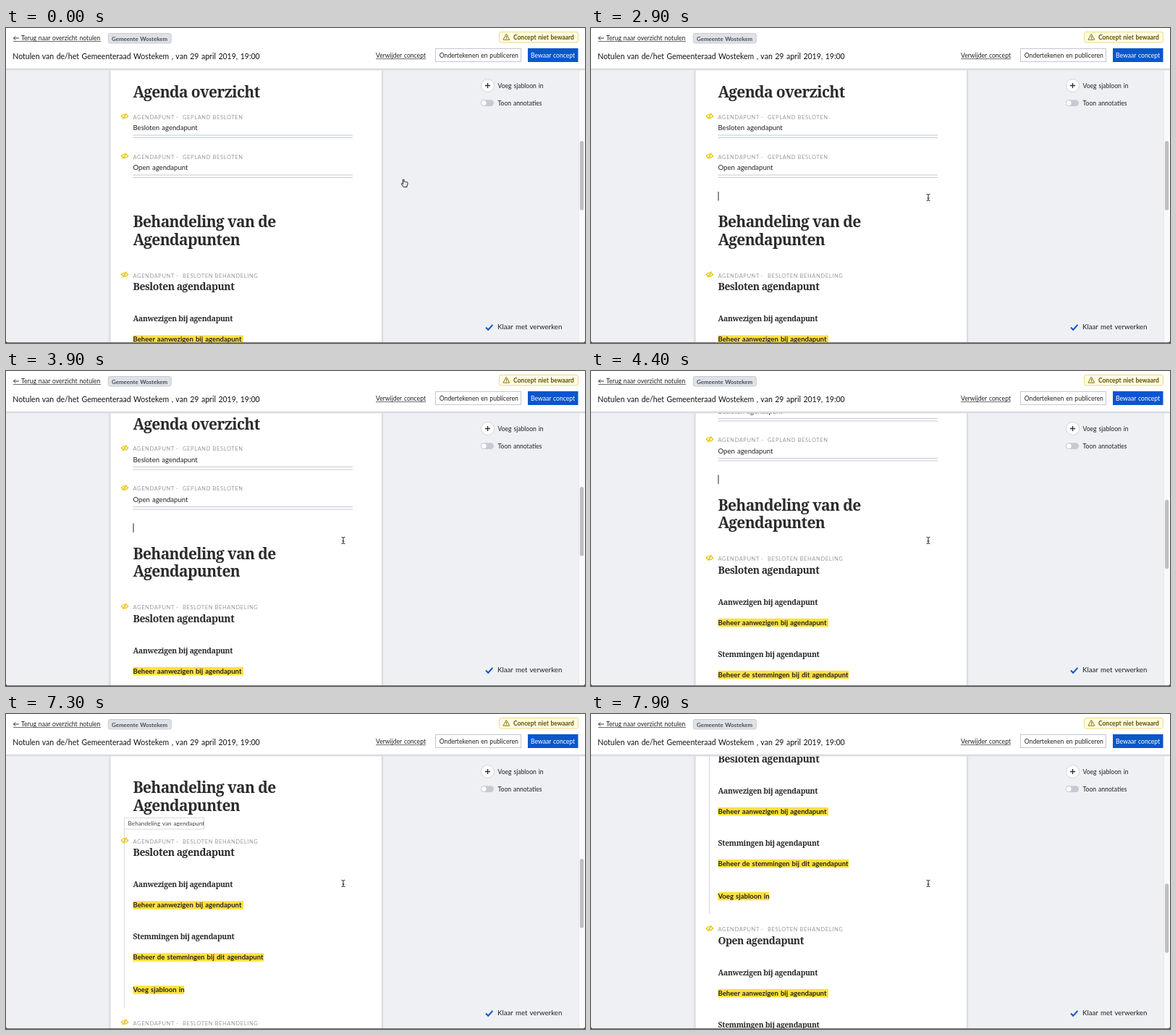
Animation, 800 px wide and 435 px high, one loop 8 s. Source, as an HTML page:

```html
<!DOCTYPE html>
<html lang="nl">
<head>
<meta charset="utf-8">
<title>Notulen</title>
<style>
  @property --scroll { syntax: "<number>"; inherits: true; initial-value: 0; }

  html, body { margin: 0; width: 100%; height: 100%; overflow: hidden; background: #fff; }
  svg { display: block; }
  #stage { --loop: 8s; animation: scroll var(--loop) linear infinite; }

  text { font-family: Lato, "Open Sans", sans-serif; font-size: 8.6px; fill: #222; word-spacing: .08em; white-space: pre; }
  .title { font-size: 10.5px; fill: #111; }
  .body { font-size: 9.55px; }
  .strong { font-weight: 700; }
  .meta text { font-size: 7.5px; letter-spacing: .62px; word-spacing: 0; fill: #9b9b9b; }
  .h1, .h3, .h4 { font-family: "Noto Serif", serif; font-weight: 700; letter-spacing: -.031em; word-spacing: 0; fill: #2b2b2b; }
  .h1 { font-size: 21px; }
  .h3 { font-size: 13.95px; }
  .h4 { font-size: 10.4px; font-weight: 600; }
  .mark { fill: #ffe13d; }
  .rule { stroke: #c3cad6; }
  .line { fill: none; stroke-linecap: round; stroke-linejoin: round; }

  #content { transform: translateY(calc(var(--scroll) * -1px)); }
  #thumb { transform: translateY(calc(var(--scroll) * .265px)); }
  #hover { animation: hover var(--loop) step-end infinite; }
  #caret { animation: caret var(--loop) step-end infinite; }
  #pointer { animation: pointer var(--loop) linear infinite; }
  #hand { animation: hand var(--loop) step-end infinite; }
  #beam { animation: beam var(--loop) step-end infinite; }

  /* 1.25% is one tick of 100 ms */
  @keyframes scroll {
    0% { --scroll: 0; }
    43.75% { --scroll: 0; animation-timing-function: steps(4); }
    48.75% { --scroll: 15.5; animation-timing-function: steps(5); }
    55% { --scroll: 82.5; animation-timing-function: steps(3); }
    58.75% { --scroll: 128; animation-timing-function: steps(3); }
    62.5% { --scroll: 162; animation-timing-function: steps(1); }
    63.75% { --scroll: 166; }
    91.25% { --scroll: 166; animation-timing-function: steps(2); }
    93.75% { --scroll: 190; animation-timing-function: steps(4); }
    98.75%, 100% { --scroll: 295.5; }
  }
  @keyframes hover {
    0% { opacity: 0; transform: none; }
    57.5% { opacity: 1; transform: none; }
    65%, 100% { opacity: 1; transform: translateX(1px); }
  }
  @keyframes caret {
    0%, 28.75%, 66.25%, 78.75%, 91.25%, 100% { opacity: 0; }
    22.5%, 35%, 72.5%, 85% { opacity: 1; }
  }
  @keyframes pointer {
    0% { transform: translate(551px, 214px); }
    6.25% { transform: translate(551px, 214px); animation-timing-function: steps(8); }
    16.25%, 100% { transform: translate(466px, 234px); }
  }
  @keyframes hand { 0% { opacity: 1; } 11.25%, 100% { opacity: 0; } }
  @keyframes beam { 0% { opacity: 0; } 11.25%, 100% { opacity: 1; } }
</style>
</head>
<body>
<svg id="stage" width="800" height="435" viewBox="0 0 800 435">
  <defs>
    <clipPath id="view"><rect y="57" width="800" height="378"/></clipPath>
    <filter id="soft" x="-5%" width="110%"><feGaussianBlur stdDeviation="1.5"/></filter>
    <g id="eye" class="line" stroke="#e9c80e" stroke-width="1.3">
      <path d="M-4.8 0Q0 -5.4 4.8 0Q0 5.4 -4.8 0Z"/>
      <path d="M-2.4 3.6L2.4 -3.8"/>
      <circle r="1.2" fill="#e9c80e" stroke="none"/>
    </g>
    <g id="planned" class="meta">
      <use href="#eye" x="164" y="-4"/>
      <text x="175.5">AGENDAPUNT</text><text x="235">-</text>
      <text x="244">GEPLAND BESLOTEN</text>
    </g>
    <g id="rules" class="rule">
      <path d="M175.5 .5h303.5M175.5 4h303.5"/>
    </g>
    <g id="treatment">
      <g class="meta">
        <use href="#eye" x="164" y="340.5"/>
        <text x="175.5" y="344.5">AGENDAPUNT</text><text x="235" y="344.5">-</text>
        <text x="244" y="344.5">BESLOTEN BEHANDELING</text>
      </g>
      <text class="h4" x="175.5" y="405">Aanwezigen bij agendapunt</text>
      <rect class="mark" x="175.5" y="424.3" width="152.5" height="11.5"/>
      <text class="body strong" x="175.5" y="433.3">Beheer aanwezigen bij agendapunt</text>
      <text class="h4" x="175.5" y="477.3">Stemmingen bij agendapunt</text>
      <rect class="mark" x="175.5" y="496.3" width="180.7" height="11.5"/>
      <text class="body strong" x="175.5" y="505.3">Beheer de stemmingen bij dit agendapunt</text>
      <rect class="mark" x="175.5" y="541.3" width="70.7" height="11.5"/>
      <text class="body strong" x="175.5" y="550.3">Voeg sjabloon in</text>
    </g>
  </defs>

  <rect width="800" height="435" fill="#eff0f3"/>
  <rect x="143.5" y="50" width="376.5" height="400" fill="#c4c8d0" filter="url(#soft)"/>
  <rect x="144.5" y="50" width="374.5" height="400" fill="#fff"/>

  <g clip-path="url(#view)">
    <g id="content">
      <text class="h1" x="175.5" y="96">Agenda overzicht</text>
      <use href="#planned" y="125.8"/>
      <text class="body" x="175.5" y="141.3">Besloten agendapunt</text>
      <use href="#rules" y="147.5"/>
      <use href="#planned" y="180.8"/>
      <text class="body" x="175.5" y="196.3">Open agendapunt</text>
      <use href="#rules" y="202.5"/>
      <path id="caret" d="M176 226v12.5" stroke="#222"/>
      <text class="h1" x="175.5" y="275.3">Behandeling van de</text>
      <text class="h1" x="175.5" y="299.8">Agendapunten</text>

      <g id="hover">
        <path d="M162.5 309v262.5" stroke="#d0d5de"/>
        <rect x="162.5" y="309.5" width="110" height="15.5" fill="#fff" stroke="#d6d9df"/>
        <text x="167.5" y="320" style="font-size:8.26px;fill:#444">Behandeling van agendapunt</text>
      </g>

      <use href="#treatment"/>
      <text class="h3" x="175.5" y="362.3">Besloten agendapunt</text>
      <use href="#treatment" y="251"/>
      <text class="h3" x="175.5" y="613.5">Open agendapunt</text>
    </g>
  </g>

  <!-- side tools -->
  <circle cx="665.5" cy="79.5" r="9" fill="#fff" stroke="#cfd3db"/>
  <path d="M662 79.5h7M665.5 76v7" stroke="#333" stroke-width="1.4"/>
  <text x="679.5" y="82.7">Voeg sjabloon in</text>
  <rect x="656" y="99.3" width="18" height="8.6" rx="4.3" fill="#c6cad4"/>
  <circle cx="660.3" cy="103.6" r="3.9" fill="#fff" stroke="#c0c5cf" stroke-width=".8"/>
  <text x="679.5" y="106.8">Toon annotaties</text>
  <path d="M663 413.5l3.2 3.2 6.2 -6.8" fill="none" stroke="#0b56cc" stroke-width="2"/>
  <text x="679" y="416.3" style="font-size:9.7px">Klaar met verwerken</text>

  <!-- scrollbar -->
  <rect x="791" y="57" width="9" height="378" fill="#fafafa"/>
  <path d="M791.5 57v378" stroke="#e8e8e8"/>
  <rect id="thumb" x="793" y="156" width="5.2" height="95.5" rx="2.6" fill="#bfbfbf"/>

  <!-- header -->
  <rect y="57" width="800" height="1.5" fill="#dfe1e6"/>
  <rect width="800" height="56" fill="#fff"/>
  <rect y="56" width="800" height="1" fill="#cfd2d9"/>
  <path class="line" d="M17.5 14h-7M13 11.5l-2.5 2.5l2.5 2.5" stroke="#222" stroke-width=".9"/>
  <text x="21" y="17">Terug naar overzicht notulen</text>
  <path d="M10 18.5h121" stroke="#444" stroke-width=".8"/>
  <rect x="141.3" y="7.5" width="87" height="13.5" rx="2.5" fill="#dfe1e6" stroke="#c9ccd3"/>
  <text class="strong" x="146" y="17.5" style="font-size:7.95px;fill:#4a4f59">Gemeente Wostekem</text>
  <text class="title" x="9.3" y="43">Notulen van de/het Gemeenteraad Wostekem , van 29 april 2019, 19:00</text>

  <rect x="681.5" y="5.5" width="109" height="14.5" rx="2.5" fill="#fffbe3" stroke="#ecdc86"/>
  <path class="line" d="M691.5 8.6l4.2 7.6h-8.4z" fill="#ffe13d" stroke="#8a7400"/>
  <path d="M691.5 11v2.6M691.5 14.3v1" stroke="#5c4d00" stroke-width=".9"/>
  <text class="strong" x="701" y="15.8" style="font-size:8.46px;fill:#5f5000">Concept niet bewaard</text>

  <text x="511" y="41">Verwijder concept</text>
  <path d="M511 42.6h69" stroke="#444" stroke-width=".8"/>
  <rect x="593.5" y="28.5" width="118" height="18" fill="#fff" stroke="#c3c7d0"/>
  <text x="598.8" y="41">Ondertekenen en publiceren</text>
  <rect x="721" y="28" width="69.5" height="19" fill="#0b56cc"/>
  <text x="725" y="41" style="fill:#fff">Bewaar concept</text>

  <!-- window edge -->
  <path d="M0 434.5h800" stroke="#6b6b6b"/>
  <path d="M0 432v3h3q-2.5 -.5 -3 -3zM800 432v3h-3q2.5 -.5 3 -3z" fill="#444"/>

  <g id="pointer">
    <path id="hand" class="line" d="M-2.6 -4.6q.9 -.9 1.7 0v3.2q.9 -.7 1.6 .1q.9 -.6 1.6 .2q.9 -.5 1.7 .4v2.7l-1 2v1.6h-4.6l-3 -3.8q-.4 -1.4 .9 -1.2l1.1 1z" fill="#fff" stroke="#222"/>
    <path id="beam" class="line" d="M-2 -4.5q1.6 0 2 1q.4 -1 2 -1M0 -3.5v7M-2 4.5q1.6 0 2 -1q.4 1 2 1M-1 .9h2" stroke="#222"/>
  </g>
</svg>
</body>
</html>
```
